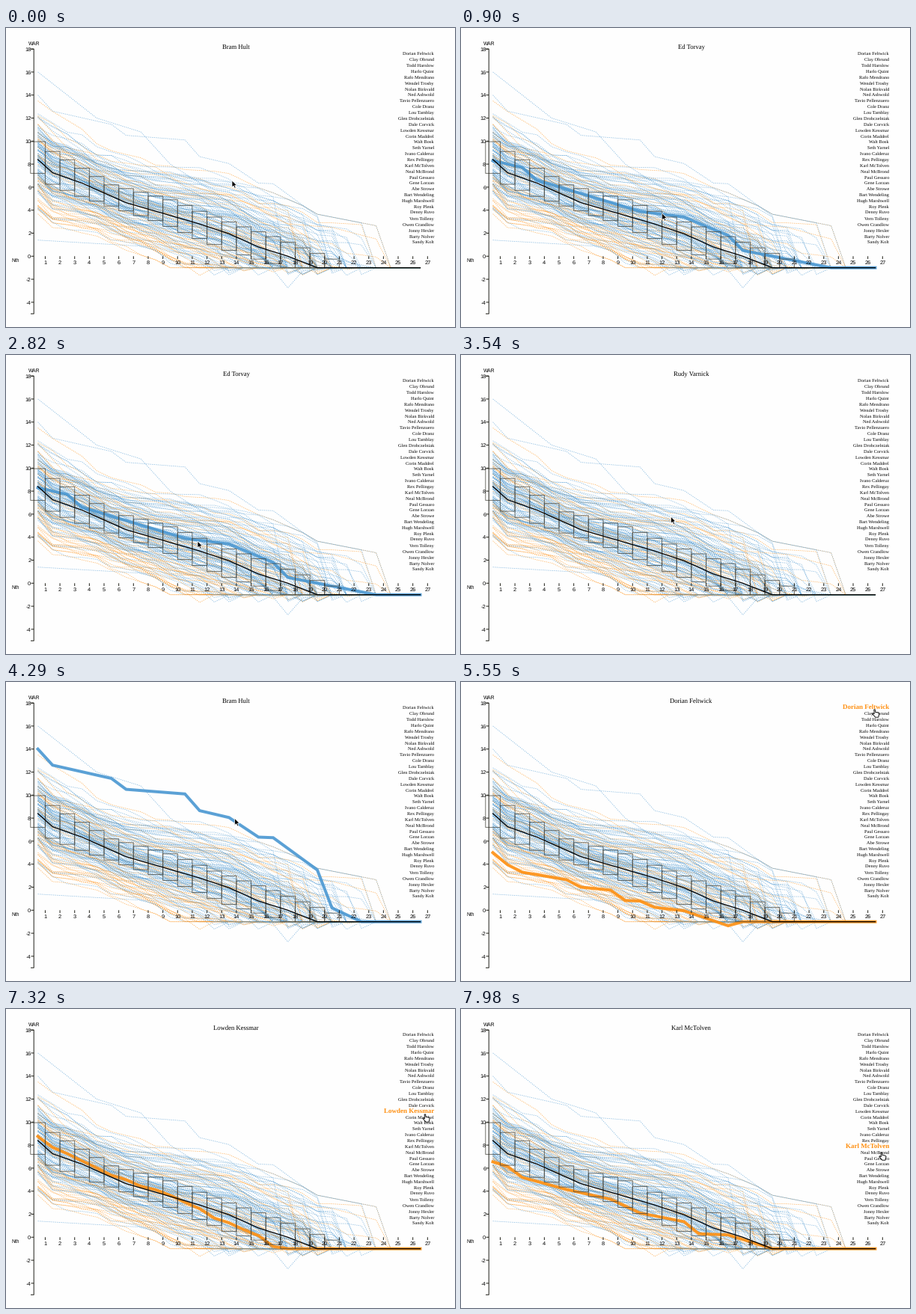
Animation, 600 px wide and 400 px high, one loop 8 s. Source, as a matplotlib script:

```python
import numpy as np
import matplotlib.pyplot as plt
from matplotlib.animation import FuncAnimation
from matplotlib.collections import LineCollection
from matplotlib.patches import Polygon

plt.rcParams["text.hinting"] = "none"
W, H, DPI = 600, 400, 100
LOOP, STEP = 8000, 20
SAMPLE = 90    # ms between hover checks
PX = 72 / DPI  # points per pixel
SERIF, SANS = "Liberation Serif", "Liberation Sans"
PAPER, ORANGE, BLUE = "#fefefe", "#ff9012", "#4b98d2"
SEASONS = np.arange(27)
GAP, ROW = 19.65, 7.875

NAMES = """Dorian Feltwick,Clay Obrund,Todd Harnlow,Harlo Quint,Rafo Mendrano,
Wendel Trosby,Nolan Birkvald,Ned Ashwold,Tavio Pellenzuero,Cole Dranz,
Lou Tamblay,Glen Drobczelniak,Dale Corvick,Lowden Kessmar,Corin Maddrel,
Walt Bosk,Seth Yarnel,Ivano Calderuz,Rex Pellingay,Karl McTolven,
Neal McBrond,Paul Gessaro,Gene Lorzan,Abe Strowe,Bart Wendeling,
Hugh Marshwell,Roy Plenk,Denny Ruvo,Vern Tolleny,Owen Crandlow,
Jonny Hexler,Barty Nolver,Sandy Kolt""".replace("\n", "").split(",")
PASSERS = ["Otis Wrenfel", "Milo Dask", "Cyrus Helmond", "Rudy Varnick", "Ansel Brovey"]

rng = np.random.default_rng(14)


def xs(k):
    return 42.6 + GAP * np.asarray(k)


def ys(v):
    return 305.3 - 15.4 * np.asarray(v)


def curve(*keys):
    """Season values running straight between (season, value) keys."""
    return np.interp(SEASONS, *zip(*keys))


# ---- data ----
MEDIAN = curve((0, 8.4), (1, 7.25), (3, 6.35), (6, 4.65), (11, 2.8), (13, 1.95),
               (15, 0.8), (17, 0), (19, -1))
UPPER = curve((0, 9.95), (1, 9.1), (5, 6.2), (9, 4.9), (12, 3.4), (16, 1.7), (20, -0.25))
LOWER = curve((0, 7.2), (1, 6.25), (3, 5.2), (8, 3.1), (13, 0.5), (17, -1))

HULT = curve((0, 14), (1, 12.6), (5, 11.45), (6, 10.5), (10, 10.1), (11, 8.65),
             (13, 8.05), (15, 6.35), (16, 6.3), (19, 3.5), (20, 0.2), (22, -1))
MORLE = curve((0, 5), (1, 3.95), (2, 3.3), (5, 2.65), (6, 2), (8, 1.75), (9, 0.85),
              (10, 0.8), (11, 0.25), (13, -0.05), (16, -1.35), (17, -1))
TORVAY = curve((0, 8.3), (2, 7.7), (3, 6.6), (10, 3.9), (13, 3.4), (16, 1.8),
               (17, 0.5), (23, -1))
BIRKVALD = curve((0, 12.1), (2, 9.4), (4, 8.85), (5, 8.25), (8, 7.75), (10, 6.1),
                 (13, 5.4), (17, 2.8), (20, 2.5), (23, 1.5), (24, -1))
MCTOLVEN = curve((0, 6.55), (1, 6.15), (2, 5.2), (5, 4.15), (8, 3.3), (10, 2.1),
                 (13, 1.35), (14, 0.3), (16, 0.2), (19, -1))
STARS = [(HULT, BLUE, "Bram Hult"), (MORLE, ORANGE, "Fizzy Morle"),
         (TORVAY, BLUE, "Ed Torvay")]
OUTLIERS = [
    (BIRKVALD, ORANGE), (MCTOLVEN, ORANGE),
    (curve((0, 16), (4, 12), (7, 10.8), (9, 8), (20, -1)), BLUE),
    (curve((0, 1.4), (8, 0.8), (12, -1)), BLUE),
    (curve((0, 6.3), (12, 0.4), (16, -1.2), (17, -2.75), (18, -1.3), (20, -1)), BLUE)]


def make_crowd(count=150):
    late = np.maximum(SEASONS - 18, 0)
    mid = MEDIAN - 0.3 * late
    spread = np.maximum((UPPER - LOWER) / 1.35, 1.6) + 0.02 * SEASONS
    lines = []
    for _ in range(count):
        z = np.clip(rng.normal(), -2.1, 2.4)
        walk = np.cumsum(rng.normal(0, 0.15, len(SEASONS)))
        v = np.sort(mid + spread * np.clip(z + walk, -2.4, 2.5))[::-1]
        v[int(np.clip(rng.normal(19.5 + z, 2), 12, 24)):] = -1
        v = np.maximum(v, -1)
        last = int(np.argmax(v <= -1))
        if rng.random() < 0.25:
            v[last] -= rng.uniform(0.1, 0.7)
        orange = rng.random() < (0.7 if z < -0.6 else 0.17)
        lines.append((v, ORANGE if orange else BLUE))
    return lines


CROWD = make_crowd()

# ---- pointer: (time, x, y) ----
PATH = np.array([
    (0, 302, 204), (700, 276, 238), (1740, 238, 289), (2150, 232, 292),
    (2820, 256, 249), (4290, 306, 182), (4800, 420, 108),
    (5300, 547, 36), (5550, 552, 37), (6570, 557, 83), (7980, 561, 192)])
ARROW = np.array([(0, 0), (0, 9), (2.1, 7.2), (3.6, 10.4), (5.1, 9.7), (3.7, 6.6), (6.4, 6.4)])
HAND = np.array([(0, 0), (1.6, 0), (1.9, 3.4), (5.2, 3.9), (7.1, 5.2), (6, 10.2),
                 (1.9, 10.2), (-2.2, 5.4), (-1.4, 4.6), (0.4, 5.8)])


def pointer(t):
    return np.array([np.interp(t, PATH[:, 0], PATH[:, i]) for i in (1, 2)])


def over_list(spot):
    return spot[0] > 505


# ---- hover ----
def hit(spot, lines, reach):
    """The line closest to the pointer, if it is within reach."""
    def gap(line):
        return abs(np.interp(spot[0], xs(SEASONS), ys(line[0])) - spot[1])
    best = min(lines, key=gap)
    return best if gap(best) < reach else None


def make_timeline():
    """List of (start, values, colour, title, list row)."""
    title = "Bram Hult"
    out = [(0, None, ORANGE, title, None)]
    row_lines = {0: MORLE, 6: BIRKVALD, 19: MCTOLVEN}
    for t in range(SAMPLE, LOOP, SAMPLE):
        spot = pointer(t)
        values, color, row = None, ORANGE, None
        if over_list(spot):
            row = int((spot[1] - 35) // ROW)
            title = NAMES[row]
            values = row_lines.get(row, CROWD[row * 37 % len(CROWD)][0])
        elif star := hit(spot, STARS, 8):
            values, color, title = star
        elif near := hit(spot, CROWD, 0.6):
            values, color = near
            title = PASSERS[t // SAMPLE % len(PASSERS)]
        before = out[-1]
        if values is not before[1] or row != before[4]:
            out.append((t, values, color, title, row))
    return out


TIMELINE = make_timeline()
STARTS = [state[0] for state in TIMELINE]

# ---- stage ----
fig = plt.figure(figsize=(W / DPI, H / DPI), dpi=DPI, facecolor=PAPER)


def layer(z):
    ax = fig.add_axes([0, 0, 1, 1], zorder=z)
    ax.set_xlim(0, W)
    ax.set_ylim(H, 0)
    ax.axis("off")
    return ax


chart = layer(1)


def label(x, y, text, size, family, ha="center", **kw):
    return chart.text(x, y, text, fontsize=size * PX, family=family, ha=ha,
                      va="baseline", **{"color": "black", **kw})


def strokes(segments, color, width, z, **kw):
    chart.add_collection(LineCollection(segments, colors=color, linewidths=width * PX,
                                        zorder=z, **kw), autolim=False)


def trace(values):
    return np.column_stack([xs(SEASONS), ys(values)])


everyone = CROWD + OUTLIERS + [star[:2] for star in STARS]
strokes([trace(v) for v, _ in everyone], [c for _, c in everyone], 0.8, 1,
        linestyles=[(0, (1.6, 1.6))], alpha=0.65)
glow, = chart.plot([], [], lw=4 * PX, alpha=0.9, zorder=2, solid_joinstyle="miter")

boxes = []
for i in range(21):
    a, b = xs(i - 0.5), xs(i + 0.5)
    top, bottom = ys(UPPER[i]), ys(LOWER[i])
    boxes.append([(a, top), (b, top), (b, bottom), (a, bottom), (a, top)])
strokes(boxes, "#44443c", 1, 3, alpha=0.75, snap=False)
chart.plot(*trace(MEDIAN).T, color="black", lw=1.3 * PX, zorder=4)

axis = [[(33, 28.2), (37.2, 28.2), (37.2, 382.3), (33, 382.3)]]
for v in range(-4, 19, 2):
    axis.append([(33.5, ys(v)), (37.2, ys(v))])
    label(33.3, ys(v) + 2.6, str(v), 7.5, SANS, "right")
for n in SEASONS + 1:
    x = xs(n - 0.5)
    axis.append([(x, 305.3), (x, 309)])
    label(x, 316.2, str(n), 7.5, SANS)
strokes(axis, "#22221a", 1, 5, snap=False)
label(37.5, 22.6, "WAR", 6.8, SANS)
label(13, 312.6, "Nth", 6.8, SANS)

title = label(307.5, 28.3, "", 8.7, SERIF)
roster = [label(572, 36.2 + ROW * i, name, 6.4, SERIF, "right")
          for i, name in enumerate(NAMES)]
picked = label(572, 0, "", 9, SERIF, "right", weight="bold", color=ORANGE)


def render(values, color, heading, row):
    """Draw the chart in one hover state and keep its pixels."""
    points = trace(values).T if values is not None else ([], [])
    glow.set_data(*points)
    glow.set_color(color)
    title.set_text(heading)
    for i, name in enumerate(roster):
        name.set_visible(i != row)
    picked.set_text("" if row is None else NAMES[row])
    picked.set_y(36.4 + ROW * (row or 0))
    fig.canvas.draw()
    return np.array(fig.canvas.buffer_rgba())


scenes = [render(*state[1:]) for state in TIMELINE]
chart.set_visible(False)

view = fig.figimage(scenes[0], zorder=0)
front = layer(2)
arrow = front.add_patch(Polygon(ARROW, fc="black", ec="white", lw=0.7 * PX))
hand = front.add_patch(Polygon(HAND, fc="white", ec="black", lw=0.9 * PX))


def update(frame):
    t = frame * STEP
    view.set_data(scenes[np.searchsorted(STARTS, t, side="right") - 1])
    spot = pointer(t)
    arrow.set_visible(not over_list(spot))
    hand.set_visible(over_list(spot))
    arrow.set_xy(ARROW + spot)
    hand.set_xy(HAND + spot)
    return view, arrow, hand


anim = FuncAnimation(fig, update, frames=LOOP // STEP, interval=STEP,
                     init_func=lambda: update(0), repeat=True, repeat_delay=0)
plt.show()
```
